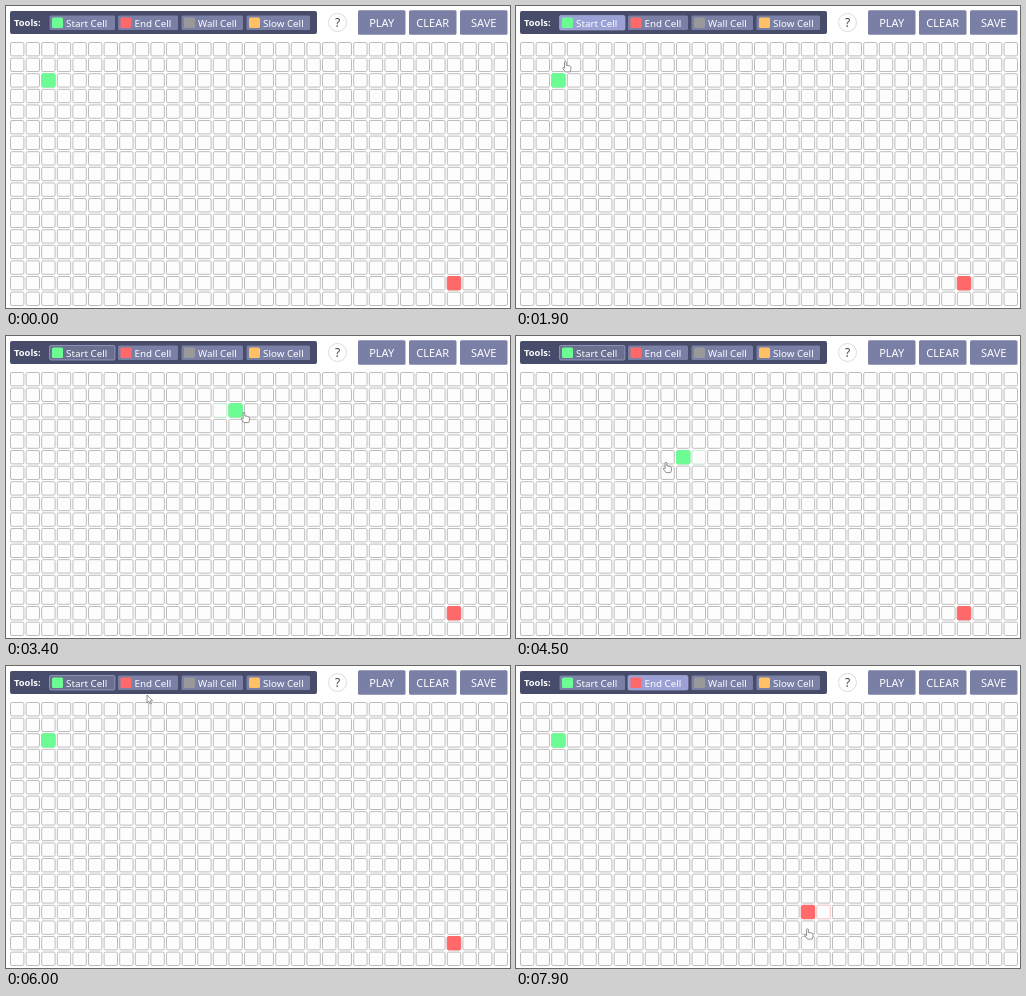
An HTML page for the animation above (8000 ms loop, 504x302 px).

```html
<!DOCTYPE html>
<html lang="en">
<head>
<meta charset="utf-8">
<title>Pathfinding grid</title>
<style>
  html, body { margin: 0; width: 100%; height: 100%; overflow: hidden; background: #fff; }
  svg { display: block; width: 504px; height: 302px; }
  text { font-family: "Noto Sans", "Open Sans", sans-serif; font-weight: 500; fill: #fff; }
</style>
</head>
<body>
<svg id="stage" viewBox="0 0 504 302"></svg>
<script>
const LOOP = 8000, STEP = 100;
const COLS = 32, ROWS = 17, PITCH = 15.6, LEFT = 4.5, TOP = 36.5, SIZE = 13.4;
const GREEN = '#6bfc93', RED = '#ff6969';
const BASE = [122, 127, 166], BRIGHT = [155, 161, 213];
const PRESSED = -.45;
const stage = document.getElementById('stage');

function set(node, attrs) {
  for (const key in attrs) node.setAttribute(key, attrs[key]);
  return node;
}
function add(tag, attrs, label) {
  const node = set(document.createElementNS('http://www.w3.org/2000/svg', tag), attrs);
  if (label) node.textContent = label;
  return stage.appendChild(node);
}
function box(x, y, width, height, fill, rx = 1.5) {
  return add('rect', { x, y, width, height, fill, rx });
}
const mix = amount => `rgb(${BASE.map((v, i) => Math.round(v + (BRIGHT[i] - v) * amount))})`;
const clamp = v => Math.max(0, Math.min(1, v));
const cellAt = p => [Math.floor((p.x - LEFT + 1) / PITCH), Math.floor((p.y - TOP + 1) / PITCH)];
const place = ([col, row]) => ({ x: LEFT + col * PITCH, y: TOP + row * PITCH });

// Toolbar
function makeButton(x, y, w, h) {
  return { x, y, w, h, node: box(x, y, w, h, mix(0)) };
}
box(4, 5, 307, 23, '#474c6b', 2);
add('text', { x: 8, y: 20.3, 'font-size': 9.4, style: 'font-weight:700' }, 'Tools:');

const tools = [
  ['Start Cell', 43.5, 65.5, GREEN],
  ['End Cell', 112, 60, RED],
  ['Wall Cell', 175.5, 61.5, '#999'],
  ['Slow Cell', 240.5, 63.5, '#ffc066']
].map(([label, x, w, color]) => {
  const button = makeButton(x, 9.5, w, 14.5);
  box(x + 2.5, 11.5, 11, 10.5, color);
  add('text', { x: x + 16.5, y: 20.5, 'font-size': 9.8 }, label);
  return button;
});
const actions = ['PLAY', 'CLEAR', 'SAVE'].map((label, i) => {
  const button = makeButton(352 + i * 51, 4.3, 47.5, 24.4);
  add('text', { x: button.x + 23.7, y: 20.7, 'font-size': 11, 'text-anchor': 'middle' }, label);
  return button;
});
const buttons = [...tools, ...actions];

add('circle', { cx: 331.5, cy: 16.5, r: 9, fill: '#fff', stroke: '#ddd' });
add('text', { x: 331.5, y: 20.8, 'font-size': 12, 'text-anchor': 'middle', style: 'fill:#444' }, '?');

// Grid
function makeCell(fill, stroke) {
  return set(box(0, 0, SIZE, SIZE, fill), { stroke });
}
for (let i = 0; i < ROWS * COLS; i++) {
  set(makeCell('#fdfdfd', '#bdbdbd'), place([i % COLS, Math.floor(i / COLS)]));
}
function makeMarker(color, pale) {
  return { trail: makeCell('#fdfdfd', pale), cell: makeCell(color, color) };
}
const start = makeMarker(GREEN, '#c9f3d5');
const end = makeMarker(RED, '#ffc9c9');

// Pointers, both with the hot spot at 0,0
const outline = { fill: '#fff', stroke: '#777', 'stroke-width': .8, 'stroke-linejoin': 'round' };
const arrow = add('path', { d: 'M0 0V8L1.9 6.3L3.2 9L4.4 8.5L3.2 5.8H5.6Z', ...outline });
const hand = add('path', {
  d: 'M-.9 .8Q0-.6 .9 .8V4L2.6 4.1L4.2 4.6Q5.5 4.8 5.5 6.2V8L4.6 10.6H0L-2.6 7.2Q-2.8 5.8-1.7 6.2L-.9 7Z',
  ...outline
});

// Pointer key points: time, x, y
const path = [
  [400, 425, 2], [1100, 111, 16], [1600, 70, 18], [2100, 43, 75],
  [2600, 99, 75], [3400, 238, 76], [3650, 246, 90], [3900, 236, 119],
  [4500, 150, 126], [5300, 42, 75], [6000, 141, 29], [6500, 150, 17],
  [7100, 446, 273], [7500, 390, 262], [7800, 288, 250], [7900, 291.5, 262.5]
];

// Monotone spline: speed is zero wherever the direction reverses
function speed(i, axis) {
  const rate = j => (path[j + 1][axis] - path[j][axis]) / (path[j + 1][0] - path[j][0]);
  if (i === 0) return rate(0);
  if (i === path.length - 1) return rate(i - 1);
  const a = rate(i - 1), b = rate(i);
  return a * b > 0 ? 2 * a * b / (a + b) : 0;
}
function pointerAt(t) {
  const time = Math.max(path[0][0], Math.min(path.at(-1)[0], t));
  const i = Math.max(1, path.findIndex(key => key[0] >= time));
  const from = path[i - 1], to = path[i], span = to[0] - from[0];
  const u = (time - from[0]) / span, ease = u * u * (3 - 2 * u);
  const along = axis => from[axis] + (to[axis] - from[axis]) * ease
    + span * u * (1 - u) * ((1 - u) * speed(i - 1, axis) - u * speed(i, axis));
  return { x: along(1), y: along(2) };
}

// A dragged cell follows the pointer one step late and leaves a fading border
function dragged(t, from, to, home) {
  return t < from ? home : cellAt(pointerAt(Math.min(t, to) - STEP));
}
function drawMarker({ cell, trail }, t, ...drag) {
  const now = dragged(t, ...drag), before = dragged(t - STEP, ...drag);
  set(cell, place(now));
  set(trail, { ...place(before), opacity: `${now}` === `${before}` ? 0 : 1 });
}

// A chosen tool stays bright for a while, then settles to its pressed shade
const chosenGlow = age => 1 + (PRESSED - 1) * clamp((age - 1500) / 300);
const within = (p, b) => p.x >= b.x && p.x <= b.x + b.w && p.y >= b.y && p.y <= b.y + b.h;

function draw(t) {
  const p = pointerAt(t), visible = t >= path[0][0];
  const over = visible && buttons.find(b => within(p, b));
  const picks = [1500, 6400];
  buttons.forEach((b, i) => {
    const chosen = t >= picks[i] && !(t >= picks[i + 1]);
    const glow = b === over ? 1 : chosen ? chosenGlow(t - picks[i]) : 0;
    set(b.node, { fill: mix(glow), stroke: chosen ? '#a3a8cf' : 'none', 'stroke-width': .7 });
  });

  drawMarker(start, t, 2200, 5400, [2, 2]);
  drawMarker(end, t, 7200, LOOP, [28, 15]);

  const isHand = over || p.y > TOP;
  const transform = `translate(${p.x} ${p.y})`;
  set(arrow, { transform, opacity: visible && !isHand ? 1 : 0 });
  set(hand, { transform, opacity: visible && isHand ? 1 : 0 });
}

const origin = performance.now();
function tick() {
  const t = (performance.now() - origin) % LOOP;
  draw(Math.floor(t / STEP) * STEP);
  requestAnimationFrame(tick);
}
tick();
</script>
</body>
</html>
```
